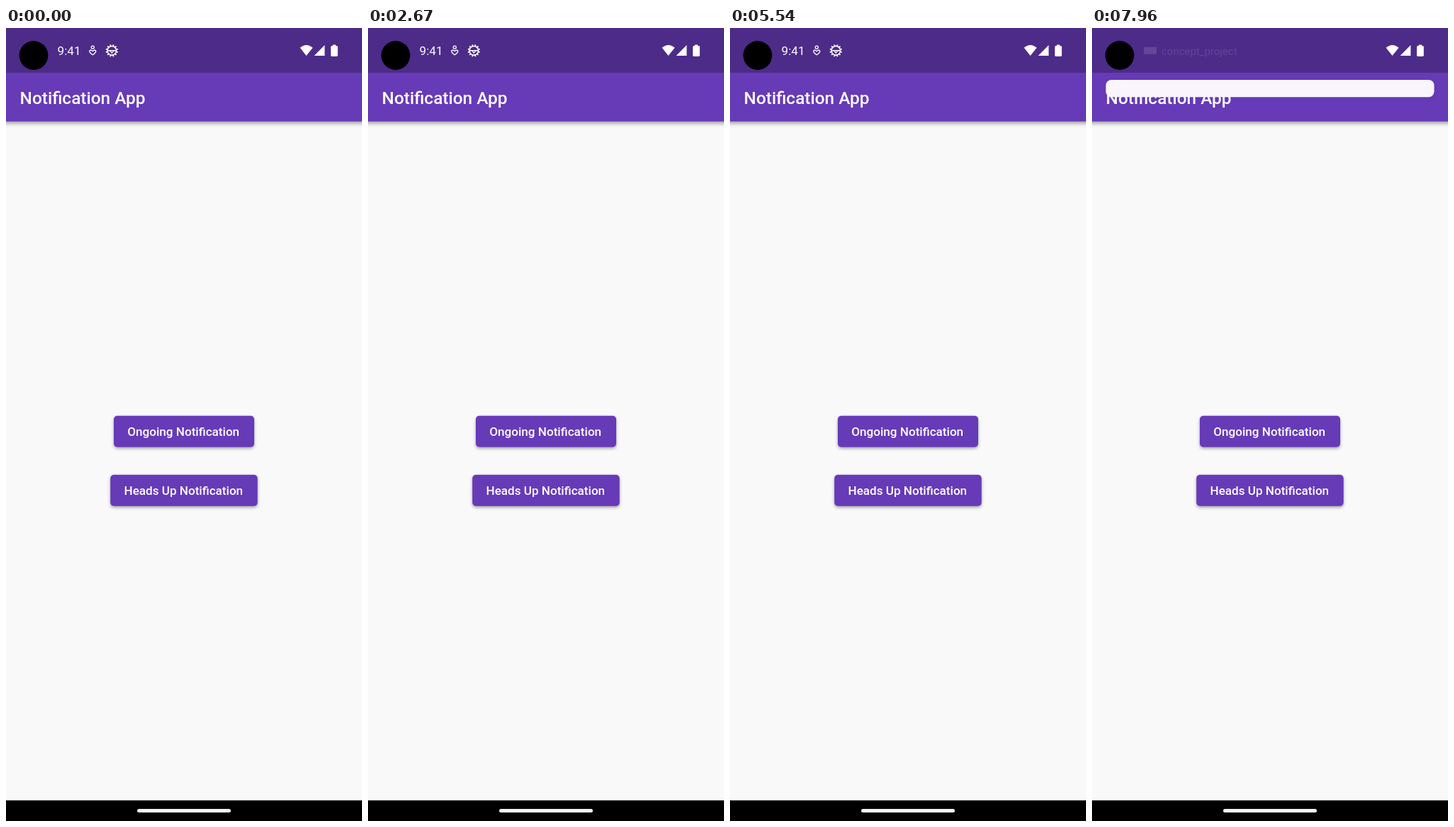
These frames come from a looping animation (502x1116 px, 8 s). An HTML page with a canvas:

```html
<!DOCTYPE html>
<html lang="en">
<head>
<meta charset="utf-8">
<title>Notification App</title>
<style>
html, body { margin: 0; width: 502px; height: 1116px; overflow: hidden; background: #f9f9fa; }
canvas { display: block; width: 502px; height: 1116px; }
</style>
</head>
<body>
<canvas id="stage"></canvas>
<script>
const W = 502, H = 1116, LOOP = 8000;
const PURPLE = '#673ab7';
const OPEN_TIME = 360;
const canvas = document.getElementById('stage');
const ctx = canvas.getContext('2d');
const ratio = window.devicePixelRatio || 1;
canvas.width = W * ratio;
canvas.height = H * ratio;

// Opening and closing times of each heads-up card, and button taps
const cards = [{ open: 3497, close: 5130 }, { open: 7850, close: Infinity }];
const taps = { ongoing: 3090, headsUp: 7440 };

const clamp = x => Math.max(0, Math.min(1, x));
const ramp = (t, from, to) => clamp((t - from) / (to - from));
const smooth = x => x * x * (3 - 2 * x);

function text(str, x, y, size, color, weight = 400) {
  ctx.font = `${weight} ${size}px Roboto, sans-serif`;
  ctx.fillStyle = color;
  ctx.fillText(str, x, y);
}

function rect(x, y, w, h, color) {
  ctx.fillStyle = color;
  ctx.fillRect(x, y, w, h);
}

function round(x, y, w, h, r, color) {
  ctx.beginPath();
  ctx.roundRect(x, y, w, h, r);
  ctx.fillStyle = color;
  ctx.fill();
}

function circle(x, y, r, color) {
  ctx.beginPath();
  ctx.arc(x, y, r, 0, Math.PI * 2);
  ctx.fillStyle = color;
  ctx.fill();
}

function ring(x, y, r, width) {
  ctx.beginPath();
  ctx.arc(x, y, r, 0, Math.PI * 2);
  ctx.lineWidth = width;
  ctx.stroke();
}

function line(points, width) {
  ctx.beginPath();
  points.forEach(([x, y]) => ctx.lineTo(x, y));
  ctx.lineWidth = width;
  ctx.stroke();
}

function shadow(alpha, blur, dy) {
  ctx.shadowColor = `rgba(0,0,0,${alpha})`;
  ctx.shadowBlur = blur * ratio;
  ctx.shadowOffsetY = dy * ratio;
}

function withAlpha(alpha, draw) {
  if (alpha <= 0) return;
  ctx.save();
  ctx.globalAlpha = alpha;
  draw();
  ctx.restore();
}

function button(label, x, y, w, textX, age) {
  const h = 44;
  const lift = age < 0 ? 0 : smooth(ramp(age, 0, 190) * (1 - ramp(age, 200, 400)));
  ctx.save();
  shadow(0.36, 4 + 8 * lift, 2 + 4 * lift);
  round(x, y, w, h, 5, PURPLE);
  ctx.restore();
  const glow = ramp(age, 0, 75) * (1 - ramp(age, 260, 400));
  withAlpha(glow * 0.24, () => {
    ctx.beginPath();
    ctx.roundRect(x, y, w, h, 5);
    ctx.clip();
    circle(x + w / 2, y + h / 2, 30 + (w / 2 - 20) * smooth(ramp(age, 0, 300)), '#fff');
  });
  text(label, textX, y + 28, 17.08, '#fff', 500);
}

function heartIcon() {
  ring(122.3, 27.2, 2, 1.3);
  ctx.beginPath();
  ctx.moveTo(122.3, 37.8);
  ctx.bezierCurveTo(114.5, 32.5, 118.5, 29.2, 122.3, 32.6);
  ctx.bezierCurveTo(126, 29.2, 130, 32.5, 122.3, 37.8);
  ctx.lineWidth = 1.4;
  ctx.stroke();
}

function gearIcon() {
  const cx = 149.3, cy = 31.8;
  ring(cx, cy, 6.3, 1.6);
  for (let i = 0; i < 12; i++) {
    const a = (i + 0.5) * Math.PI / 6, c = Math.cos(a), s = Math.sin(a);
    line([[cx + c * 6.5, cy + s * 6.5], [cx + c * 8.7, cy + s * 8.7]], 1.9);
  }
  line([[cx - 6, cy], [cx + 6, cy]], 1.5);
  line([[cx - 2.5, cy], [cx, cy + 3.5], [cx + 2.5, cy]], 1.2);
}

function systemIcons() {
  ctx.fillStyle = '#fff';
  ctx.beginPath();
  ctx.moveTo(423.5, 39);
  ctx.lineTo(414.6, 27.8);
  ctx.quadraticCurveTo(423.5, 20.2, 432.6, 27.8);
  ctx.closePath();
  ctx.fill();
  ctx.beginPath();
  ctx.moveTo(434.6, 39);
  ctx.lineTo(449.4, 39);
  ctx.lineTo(449.4, 24);
  ctx.closePath();
  ctx.fill();
  round(458, 25.2, 9.8, 14.8, 1.4, '#fff');
  rect(460.7, 23.6, 4.4, 2.4, '#fff');
}

function appScreen(t) {
  rect(0, 0, W, H, '#f9f9fa');
  ctx.save();
  shadow(0.4, 6, 2.5);
  rect(-20, 0, W + 40, 131.5, PURPLE);
  ctx.restore();
  rect(0, 0, W, 63, '#4d2b89');
  text('Notification App', 19.6, 106.5, 24.4, '#fff', 500);
  button('Ongoing Notification', 152, 545.8, 198, 171.3, t - taps.ongoing);
  button('Heads Up Notification', 147.2, 628.8, 207.5, 166.5, t - taps.headsUp);
  rect(0, 1087, W, 29, '#000');
  round(185, 1099, 132, 5, 2.5, '#f6f2f6');
}

function statusBar(u) {
  circle(39, 38.5, 20.4, '#000');
  systemIcons();
  withAlpha(1 - ramp(u, 0, 90), () => {
    text('9:41', 72.6, 38, 17.08, '#fff');
    ctx.strokeStyle = '#fff';
    heartIcon();
    gearIcon();
  });
  withAlpha(ramp(u, 92, 233), () => {
    rect(73, 26.8, 18, 10, '#fff');
    text('concept_project', 98, 37.5, 15, '#f3eff8');
  });
}

function headsUp(u) {
  const p = smooth(clamp(u / OPEN_TIME));
  if (p <= 0) return;
  ctx.save();
  shadow(0.2 * p, 36 * p, 10 * p);
  round(19.5, 73, 463, 107 * p, 34 * p, '#f8f5fd');
  ctx.restore();
  withAlpha(ramp(u, 215, OPEN_TIME), () => {
    ctx.beginPath();
    ctx.rect(19.5, 73, 463, 107 * p);
    ctx.clip();
    circle(53.7, 126.3, 14.8, '#465d91');
    rect(44, 121, 19.5, 10.8, '#fff');
    text('Notification in Status Bar', 82.6, 119, 17.08, '#1b1b1f');
    circle(279.3, 114, 1.8, '#46464f');
    text('now', 286.6, 119, 14.64, '#46464f');
    text('This notification appears only in the statu…', 83, 147.5, 17.08, '#46464f');
    circle(448, 126.8, 14.7, '#eeebee');
    ctx.strokeStyle = '#1b1b1f';
    line([[441, 123.6], [448.2, 130.8], [455.4, 123.6]], 2.2);
  });
}

// How far the card is open, expressed in opening milliseconds
function openness(t) {
  const card = cards.find(c => t >= c.open && t < c.close + OPEN_TIME);
  if (!card) return 0;
  return Math.min(t - card.open, OPEN_TIME, card.close + OPEN_TIME - t);
}

function render(t) {
  ctx.setTransform(ratio, 0, 0, ratio, 0, 0);
  const u = openness(t);
  appScreen(t);
  statusBar(u);
  headsUp(u);
}

const start = performance.now();
function frame() {
  render((performance.now() - start) % LOOP);
  requestAnimationFrame(frame);
}
frame();
</script>
</body>
</html>
```
